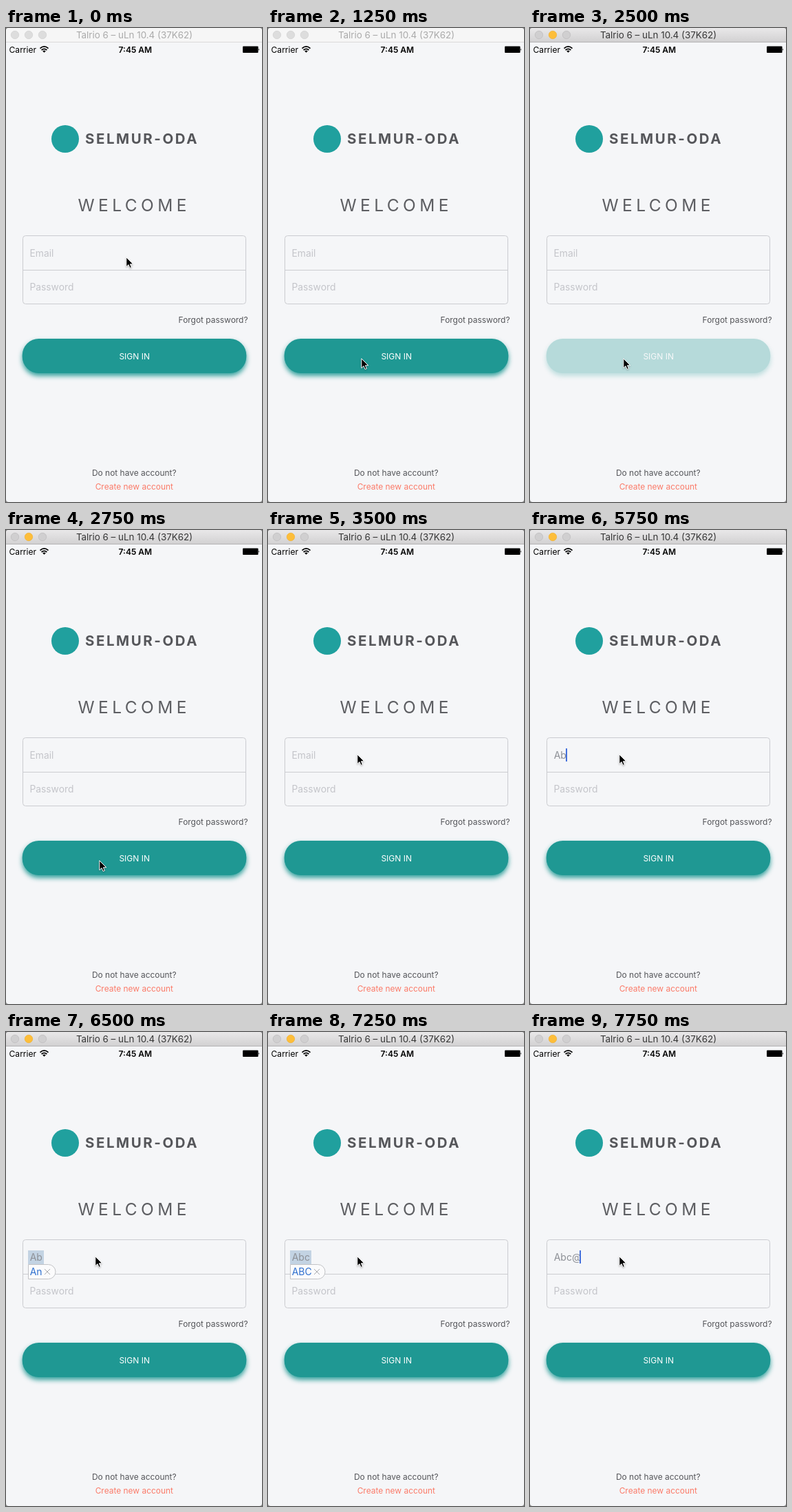
An HTML page for the animation above (8 s loop, 372 by 688 pixels).

```html
<!DOCTYPE html>
<html lang="en">
<meta charset="utf-8">
<title>Sign in</title>
<style>
  html, body { margin: 0; width: 100%; height: 100%; overflow: hidden; background: #888; }
  svg { display: block; width: 372px; height: 688px; font: 11.95px Inter, sans-serif; fill: #55565a; }
  .mid { text-anchor: middle; }
  .field { font-size: 13.8px; fill: #c4c5ca; }
  .typed { font-size: 14px; }
  .line { fill: none; stroke: #cbccd0; }
  #button { filter: drop-shadow(0 4px 3.5px #1f9893e6); }
</style>
<svg viewBox="0 0 372 688">
  <defs>
    <linearGradient id="chrome" x2="0" y2="1">
      <stop stop-color="#e9e8e9"/><stop offset="1" stop-color="#d2d1d2"/>
    </linearGradient>
  </defs>
  <rect width="372" height="688" rx="4" fill="#f5f6f8"/>

  <path id="bar" d="M0 20V4Q0 0 4 0H368Q372 0 372 4V20Z"/>
  <path id="edge" d="M0 20.5H372"/>
  <g id="dots" stroke-width=".7">
    <circle cx="13" cy="10" r="5.7"/><circle cx="33" cy="10" r="5.7"/><circle cx="53" cy="10" r="5.7"/>
  </g>
  <text id="title" class="mid" x="186.5" y="15" font-size="13.4">Talrio 6 – uLn 10.4 (37K62)</text>

  <g fill="#000">
    <text x="4.5" y="35.5" font-size="12.1">Carrier</text>
    <text class="mid" x="187.8" y="35.5" font-size="12" font-weight="600">7:45 AM</text>
    <path d="M49.5 29.6Q55.5 24.2 61.5 29.6M51.6 32Q55.5 28.6 59.4 32" fill="none" stroke="#000" stroke-width="1.7"/>
    <path d="M53.2 33.4Q55.5 31.8 57.8 33.4L55.5 35.8Z"/>
    <rect x="344" y="26.5" width="22.5" height="9.5" rx="1"/>
    <path d="M367.2 29.5q1.8 1.7 0 3.4z"/>
  </g>

  <circle cx="86" cy="161" r="20" fill="#20a09e"/>
  <text x="115" y="168" font-size="20.5" font-weight="700" letter-spacing="2.55">SELMUR-ODA</text>
  <text x="104.5" y="265.5" font-size="24.5" letter-spacing="5.4" fill="#5d5e62">WELCOME</text>

  <rect class="line" x="24.5" y="301.5" width="324" height="99" rx="4"/>
  <path class="line" d="M24.5 351.5H348.5"/>
  <text class="field" id="hint" x="34.5" y="332">Email</text>
  <text class="field" x="34.5" y="381">Password</text>

  <rect id="mark" x="32" y="317" height="20" fill="#c3d3e3"/>
  <text class="typed" id="entry" x="34.7" y="332" fill="#8d9096"></text>
  <g id="popup">
    <path id="bubble" fill="#fbfbfc" stroke="#c2c3c6"/>
    <text class="typed" id="guess" x="34.7" y="353" fill="#2f70cf"></text>
    <path id="cross" d="M-4 344l8 8m0-8l-8 8" stroke="#a9aaae"/>
  </g>
  <rect id="caret" y="317" width="2" height="19" fill="#4470dc"/>

  <text x="351.5" y="428" text-anchor="end">Forgot password?</text>
  <g id="button">
    <rect x="23.7" y="451" width="325.6" height="50" rx="24" fill="#1f9893"/>
    <text class="mid" x="186.7" y="480.5" font-size="12" fill="#fff">SIGN IN</text>
  </g>
  <text class="mid" x="186.3" y="650">Do not have account?</text>
  <text class="mid" x="186.3" y="670" fill="#fb7b69">Create new account</text>

  <path id="cursor" d="M.8 .8V14.6L4 11.6 6.1 16.4 8.4 15.4 6.4 10.8H10.8Z" fill="#000" stroke="#fff"
    style="filter:drop-shadow(0 1px 1px #0004)"/>
</svg>
<script>
  const $ = id => document.getElementById(id);
  const set = (el, attrs) => { for (const k in attrs) el.setAttribute(k, attrs[k]); };
  const show = (el, on) => { el.style.display = on ? '' : 'none'; };

  // Each row: start time in ms, then the values held until the next row.
  const cursorSteps = [[0, 174, 332], [250, 111, 534], [500, 171, 521], [750, 174, 463], [1000, 150, 468],
    [1250, 135, 479], [3000, 141, 290], [3250, 136, 286], [3500, 129, 325]];
  const caretSteps = [[0, 35, 0], [4000, 35, 1], [4250, 35, .5], [4500, 35, 0], [4750, 35, .5], [5000, 35, 1],
    [5250, 44, 1], [5750, 52, 1], [6250, 52, .4], [6500, 52, 0], [6750, 60, 1], [7250, 60, 0], [7750, 72, 1]];
  const textSteps = [[0, ''], [5250, 'A'], [5750, 'Ab'], [6750, 'Abc'], [7750, 'Abc@']];
  // Suggestion, highlight width, right edge of the bubble
  const guessSteps = [[0, '', 0, 72], [6000, 'An', 23, 71.5], [6750, 'ABC', 31, 82.5], [7750, '', 0, 72]];
  const at = (steps, t) => steps.findLast(s => s[0] <= t).slice(1);

  function draw(now) {
    const t = now % 8000;
    const active = t >= 2500;
    set($('bar'), { fill: active ? 'url(#chrome)' : '#f6f6f6' });
    set($('edge'), { stroke: active ? '#b4b3b4' : '#dadada' });
    set($('title'), { fill: active ? '#363636' : '#aaaaaa' });
    set($('dots'), { fill: active ? '#d0cfd0' : '#dddddd', stroke: active ? '#bcbbbc' : '#d0d0d0' });
    set($('dots').children[1], active ? { fill: '#fdbe3a', stroke: '#efb033' } : { fill: '#dddddd', stroke: '#d0d0d0' });
    $('button').style.opacity = active && t < 2750 ? .29 : 1;

    const [x, y] = at(cursorSteps, t);
    set($('cursor'), { transform: `translate(${x} ${y})` });

    const [entry] = at(textSteps, t);
    $('entry').textContent = entry;
    show($('hint'), !entry);

    const [guess, width, right] = at(guessSteps, t);
    show($('popup'), guess);
    $('guess').textContent = guess;
    set($('mark'), { width });
    set($('bubble'), { d: `M32.5 337.5H${right - 10}a10.5 10.5 0 0 1 0 21H32.5Z` });
    set($('cross'), { transform: `translate(${right - 11.5})` });

    const [caretX, opacity] = at(caretSteps, t);
    set($('caret'), { x: caretX, opacity });
  }

  const start = performance.now();
  (function loop() {
    draw(performance.now() - start);
    requestAnimationFrame(loop);
  })();
</script>
</html>
```
